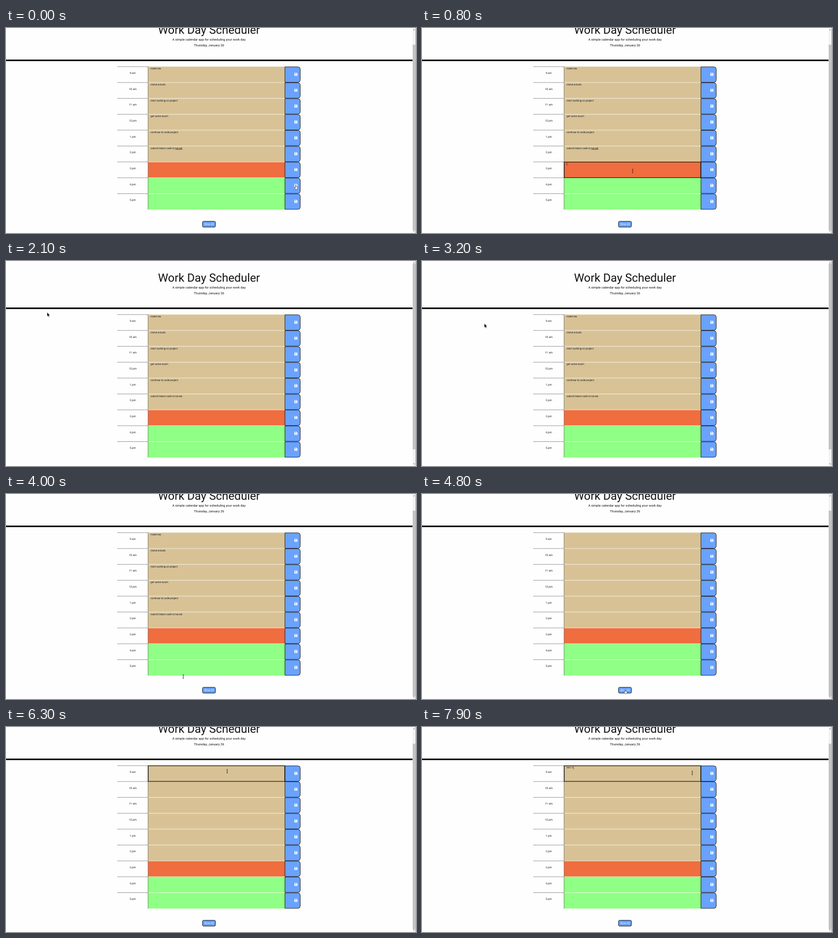
Write an HTML page that moves like this. It is 710 px wide and 357 px high and loops after 8000 ms.

```html
<!DOCTYPE html>
<html lang="en">
<head>
<meta charset="utf-8">
<title>Work Day Scheduler</title>
<style>
  html, body { margin: 0; width: 100%; height: 100%; overflow: hidden; background: #fefefe; }
  svg { display: block; width: 710px; height: 357px; }
  text { font-family: Roboto, sans-serif; fill: #111; white-space: pre; text-rendering: geometricPrecision; }
  .center { text-anchor: middle; }
  .spelling { text-decoration: underline #8a2b20 .5px; }
</style>
</head>
<body>
<svg id="stage" viewBox="0 0 710 357"></svg>
<script>
const LOOP = 8000, MAX_SCROLL = 26;
const TOP = 93.3, PITCH = 27.65, LEFT = 246, RIGHT = 483, END = 510;
const BLUE = '#69a2ff', TAN = '#d8c295', ORANGE = '#ef6d3e', GREEN = '#90ff85';
const hours = ['9 am', '10 am', '11 am', '12 pm', '1 pm', '2 pm', '3 pm', '4 pm', '5 pm'];
const tasks = ['make tea', 'check emails', 'start working on project', 'get some lunch',
  'continue to code project', 'submit latest code to '];
const rowTop = i => TOP + i * PITCH;

// [time, x, y]
const pointerPath = [
  [0, 502, 274], [200, 502, 274], [600, 400, 250], [1000, 330, 248], [1400, 106, 79], [1900, 106, 79],
  [2300, 37, 100], [2700, 37, 100], [3200, 108, 109], [3400, 108, 109], [4000, 307, 318],
  [4200, 310, 322], [4600, 352, 341], [4800, 352, 341], [5400, 405, 96], [5800, 383, 77],
  [7300, 383, 77], [7400, 440, 79], [7700, 440, 79], [7900, 468, 80], [8000, 468, 80]
];
const scrollPath = [[0, MAX_SCROLL], [1400, MAX_SCROLL], [1800, 0], [3400, 0], [3800, MAX_SCROLL], [8000, MAX_SCROLL]];
const typing = [[6500, 't'], [6700, 'te'], [6800, 'tes'], [7000, 'test'], [7100, 'test '], [7300, 'test 1']];

function el(parent, name, attrs = {}, content) {
  const node = document.createElementNS('http://www.w3.org/2000/svg', name);
  for (const key in attrs) node.setAttribute(key, attrs[key]);
  if (content !== undefined) node.textContent = content;
  return parent.appendChild(node);
}
const rect = (parent, x, y, width, height, fill, more) =>
  el(parent, 'rect', { x, y, width, height, fill, ...more });
const path = (parent, d, more) => el(parent, 'path', { d, fill: 'none', ...more });
const label = (parent, x, y, size, content, more) =>
  el(parent, 'text', { x, y, 'font-size': size, ...more }, content);
const centered = { class: 'center' };
const show = (node, on) => node.setAttribute('visibility', on ? 'visible' : 'hidden');

const stage = document.getElementById('stage');
const page = el(stage, 'g');

label(page, 351.5, 36, 19.9, 'Work Day Scheduler', centered);
label(page, 351.5, 47.8, 5.55, 'A simple calendar app for scheduling your work day', centered);
label(page, 351.5, 57.8, 5.55, 'Thursday, January 26', centered);
rect(page, 0, 81, 704, 2.6, '#000');

hours.forEach((hour, i) => {
  const y = rowTop(i);
  path(page, `M193 ${y}H${LEFT}`, { stroke: '#555', 'stroke-width': .8, 'stroke-dasharray': '1.6 .8' });
  label(page, 219.5, y + 12.8, 4.7, hour, centered);
  rect(page, LEFT, y, RIGHT - LEFT, PITCH, i < 6 ? TAN : i === 6 ? ORANGE : GREEN);
  if (i) path(page, `M${LEFT} ${y}H${RIGHT}`, { stroke: '#fff', 'stroke-width': .8, opacity: .75 });
  path(page, `M${RIGHT} ${y + .4}H${END - 4.5}q4 0 4 4V${y + PITCH - 4.4}q0 4-4 4H${RIGHT}Z`,
    { fill: BLUE, stroke: '#111', 'stroke-width': .8 });
  const icon = el(page, 'g', { transform: `translate(499.4 ${y + 10.7})` });
  path(icon, 'M.6 0H4L5.2 1.2V4.6Q5.2 5.2 4.6 5.2H.6Q0 5.2 0 4.6V.6Q0 0 .6 0Z', { fill: '#fff' });
  rect(icon, 1, .8, 2.6, 1.1, BLUE);
  el(icon, 'circle', { cx: 2.6, cy: 3.5, r: .75, fill: BLUE });
});
path(page, `M${LEFT} ${TOP}V${rowTop(9)}`, { stroke: '#444', 'stroke-width': .8, 'stroke-dasharray': '1.8 .7' });

const taskLayer = el(page, 'g');
const taskLabels = tasks.map((task, i) => label(taskLayer, 250.3, rowTop(i) + 5, 4.45, task));
const misspelled = el(taskLabels[5], 'tspan', {}, 'tarvok');

const entry = label(page, 250.3, TOP + 5, 4.45, '');
const focusBox = rect(page, LEFT + .3, 0, RIGHT - LEFT - .6, PITCH - .4, 'none', { stroke: '#111', 'stroke-width': 1.1 });
const caret = rect(page, 0, 0, .6, 4.8, '#222');

rect(page, 340.3, 362.7, 22.4, 10, BLUE, { rx: 2, stroke: '#111', 'stroke-width': .9 });
label(page, 351.5, 369.3, 4.4, 'Clear All', { class: 'center', style: 'fill:#fff' });

rect(stage, 704, 0, 6, 357, '#f3f3f3');
const thumb = rect(stage, 704.4, 0, 4.4, 323, '#c1c1c1');
path(stage, 'M705.3 3.8L706.6 2.3L707.9 3.8ZM705.3 352.7L706.6 354.2L707.9 352.7Z', { fill: '#555' });
path(stage, 'M709.6 0V357', { stroke: '#888', 'stroke-width': .7 });

const pointer = el(stage, 'g');
const arrow = path(pointer, 'M0 0V7L1.6 5.5L2.7 8L3.8 7.5L2.7 5.1H4.8Z', { fill: '#000', stroke: '#fff', 'stroke-width': .3 });
const beam = path(pointer, 'M-1-3H1M0-3V3M-1 3H1', { stroke: '#222', 'stroke-width': .8 });
const hand = path(pointer, 'M-.6 0Q0-.8.6 0V2.2L3 2.8V5L2.2 7H-.8L-2.4 4.2L-1.7 3.5L-.6 4.4Z',
  { fill: '#fff', stroke: '#111', 'stroke-width': .5 });

function sample(keys, t) {
  const next = Math.max(1, keys.findIndex(key => key[0] > t));
  const [a, b] = [keys[next - 1], keys[next]];
  const u = (t - a[0]) / (b[0] - a[0]);
  const eased = u * u * (3 - 2 * u);
  return a.slice(1).map((value, i) => value + (b[i + 1] - value) * eased);
}

function draw(t) {
  const [scroll] = sample(scrollPath, t);
  page.setAttribute('transform', `translate(0 ${-scroll})`);
  thumb.setAttribute('y', 5 + scroll * 24 / MAX_SCROLL);

  show(taskLayer, t < 4800);
  misspelled.setAttribute('class', t < 2000 ? 'spelling' : '');

  const typed = typing.filter(([time]) => time <= t).pop();
  entry.textContent = typed ? typed[1] : '';

  const focusRow = t >= 800 && t < 2000 ? 6 : t >= 6300 ? 0 : -1;
  show(focusBox, focusRow >= 0);
  focusBox.setAttribute('y', rowTop(focusRow) + .2);
  show(caret, focusRow === 6 || t >= 6500);
  caret.setAttribute('x', 250.7 + (typed ? entry.getComputedTextLength() : 0));
  caret.setAttribute('y', rowTop(focusRow) + 1.3);

  const [x, y] = sample(pointerPath, t);
  pointer.setAttribute('transform', `translate(${x} ${y})`);
  const overRows = y > TOP - scroll && y < 320;
  const overButton = overRows && x > RIGHT && x < END || x > 340 && x < 363 && y > 336;
  const overText = overRows && x > LEFT && x < RIGHT;
  show(hand, overButton);
  show(beam, overText);
  show(arrow, !overButton && !overText);
}

function frame() {
  draw(performance.now() % LOOP);
  requestAnimationFrame(frame);
}
frame();
</script>
</body>
</html>
```
